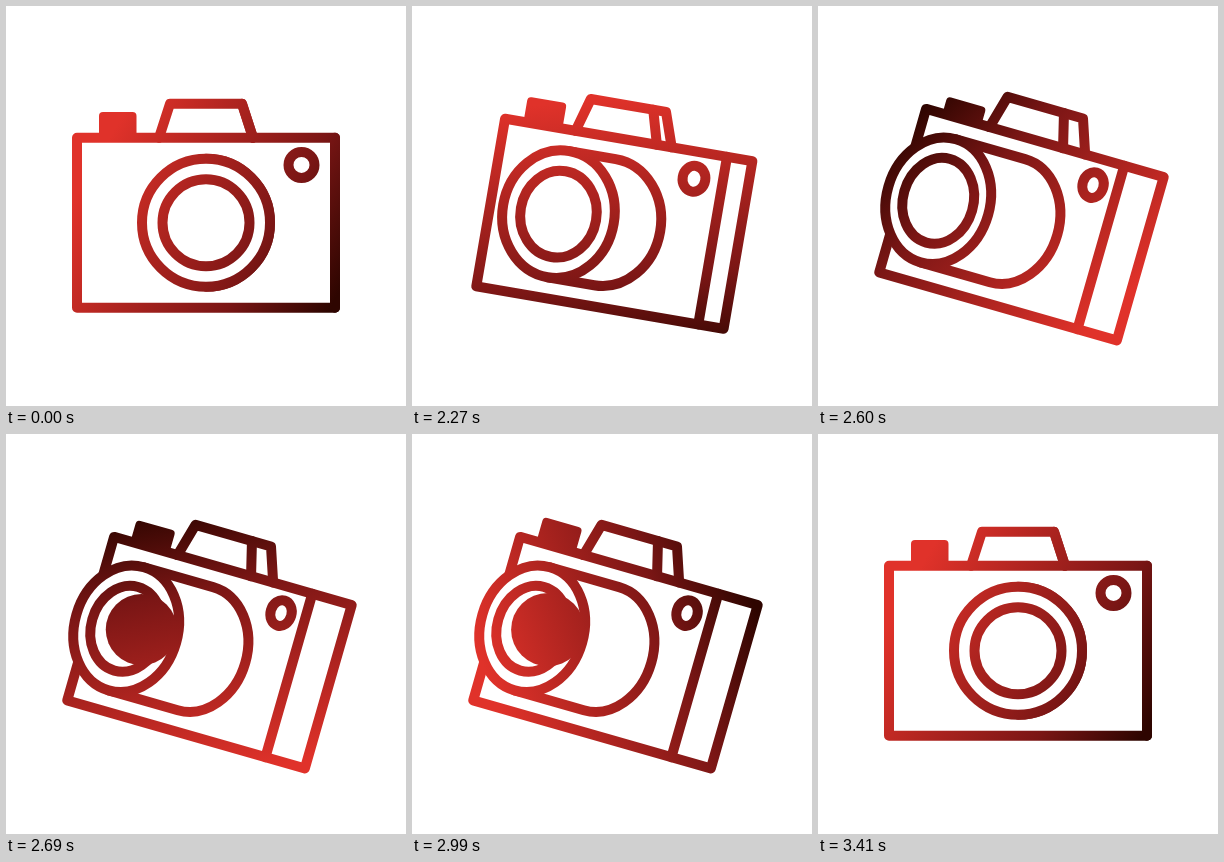
An HTML page with a canvas that plays this animation: 400x400 px, repeating every 3.5 s.

```html
<!DOCTYPE html>
<html>
<head>
<meta charset="utf-8">
<style>
  html, body { margin: 0; height: 100%; overflow: hidden; background: #fff; }
  canvas { display: block; width: 100vmin; height: 100vmin; }
</style>
</head>
<body>
<canvas width="400" height="400"></canvas>
<script>
const canvas = document.querySelector('canvas');
const ctx = canvas.getContext('2d');
const LOOP = 3500;
const RAD = Math.PI / 180;

const smooth = x => (1 - Math.cos(Math.PI * x)) / 2;
const linear = x => x;

// Value of a [time, value] keyframe list at time t
function track(keys, t, ease = smooth) {
  if (t <= keys[0][0]) return keys[0][1];
  for (let i = 1; i < keys.length; i++) {
    const [t0, a] = keys[i - 1], [t1, b] = keys[i];
    if (t < t1) return a + (b - a) * ease((t - t0) / (t1 - t0));
  }
  return keys[keys.length - 1][1];
}

const turnKeys = [[2100, 0], [2385, 1], [3000, 1], [3355, 0]];
const tiltKeys = [[2000, 0], [2100, -3], [2380, 16], [3000, 16], [3350, -2], [3410, 0]];
const shadeKeys = [[2000, 30], [2270, 83], [2600, 226], [2840, 313], [3170, 372], [3410, 390]];
const pressKeys = [[2470, 0], [2610, 8], [2750, 0]];
const flashKeys = [[2620, 0], [2845, 1], [3060, 0]];

function shade(angle) {
  const x = Math.cos(angle) * 150, y = Math.sin(angle) * 150;
  const g = ctx.createLinearGradient(-x, -y, x, y);
  g.addColorStop(0.08, '#e0322a');
  g.addColorStop(0.7, '#7b1615');
  g.addColorStop(1, '#2e0500');
  return g;
}

function line(points, close) {
  ctx.beginPath();
  points.forEach(([x, y]) => ctx.lineTo(x, y));
  if (close) ctx.closePath();
  ctx.stroke();
}

function ring(x, y, rx, ry) {
  ctx.beginPath();
  ctx.ellipse(x, y, rx, ry, 0, 0, 7);
  paint();
}

function paint() {
  const ink = ctx.fillStyle;
  ctx.fillStyle = '#fff';
  ctx.fill();
  ctx.fillStyle = ink;
  ctx.stroke();
}

function drawCamera(p, press) {
  const squeeze = 1 - 0.19 * p;
  const left = -129 + 9 * p, right = 129 - 1.8 * p;
  const edge = right - 41 * p ** 1.1;

  // Shutter button
  ctx.beginPath();
  ctx.roundRect(-107 + 4 * p, -110.7 + press, 37.5 + 3 * p, 28 - press, 4);
  ctx.fill();

  // Viewfinder hump
  line([[-47 - 7 * p, -85], [-36 - 9 * p, -119], [36 - 2.5 * p, -119], [47 - 1.5 * p, -85]]);
  line([[36 - 22.3 * p, -119], [47 - 24.5 * p, -85]]);

  // Body
  line([[left, -85], [right, -85], [right, 85], [left, 85]], true);
  line([[edge, -85], [edge, 85]]);
  ring(95.5 - 34 * p, -57.8, 13 * squeeze, 13);

  // Lens barrel and front
  const back = -11 * p, front = -83 * p;
  ctx.beginPath();
  ctx.moveTo(front, -64);
  ctx.ellipse(back, 0, 64 * squeeze, 64, 0, -Math.PI / 2, Math.PI / 2);
  ctx.lineTo(front, 64);
  paint();
  ring(front, 0, 64 * squeeze, 64);
  ring(front, 0, 43.5 * squeeze, 43.5);
}

function draw(t) {
  const turn = track(turnKeys, t);
  const tilt = track(tiltKeys, t) * RAD;
  const shadeAngle = track(shadeKeys, t, linear) * RAD;
  const flash = track(flashKeys, t);

  ctx.clearRect(0, 0, 400, 400);
  ctx.save();
  ctx.translate(200, 216.7);
  ctx.lineWidth = 10;
  ctx.lineJoin = ctx.lineCap = 'round';

  ctx.save();
  ctx.translate(0, turn);
  ctx.rotate(tilt);
  ctx.fillStyle = ctx.strokeStyle = shade(shadeAngle - tilt);
  drawCamera(turn, track(pressKeys, t));
  ctx.restore();

  if (flash > 0) {
    ctx.fillStyle = shade(shadeAngle);
    ctx.beginPath();
    ctx.arc(-80 + 68 * flash, -22.7 + 7 * flash, 157.5 * flash, 0, 7);
    ctx.fill();
  }
  ctx.restore();
}

const start = performance.now();
function tick() {
  draw((performance.now() - start) % LOOP);
  requestAnimationFrame(tick);
}
tick();
</script>
</body>
</html>
```
